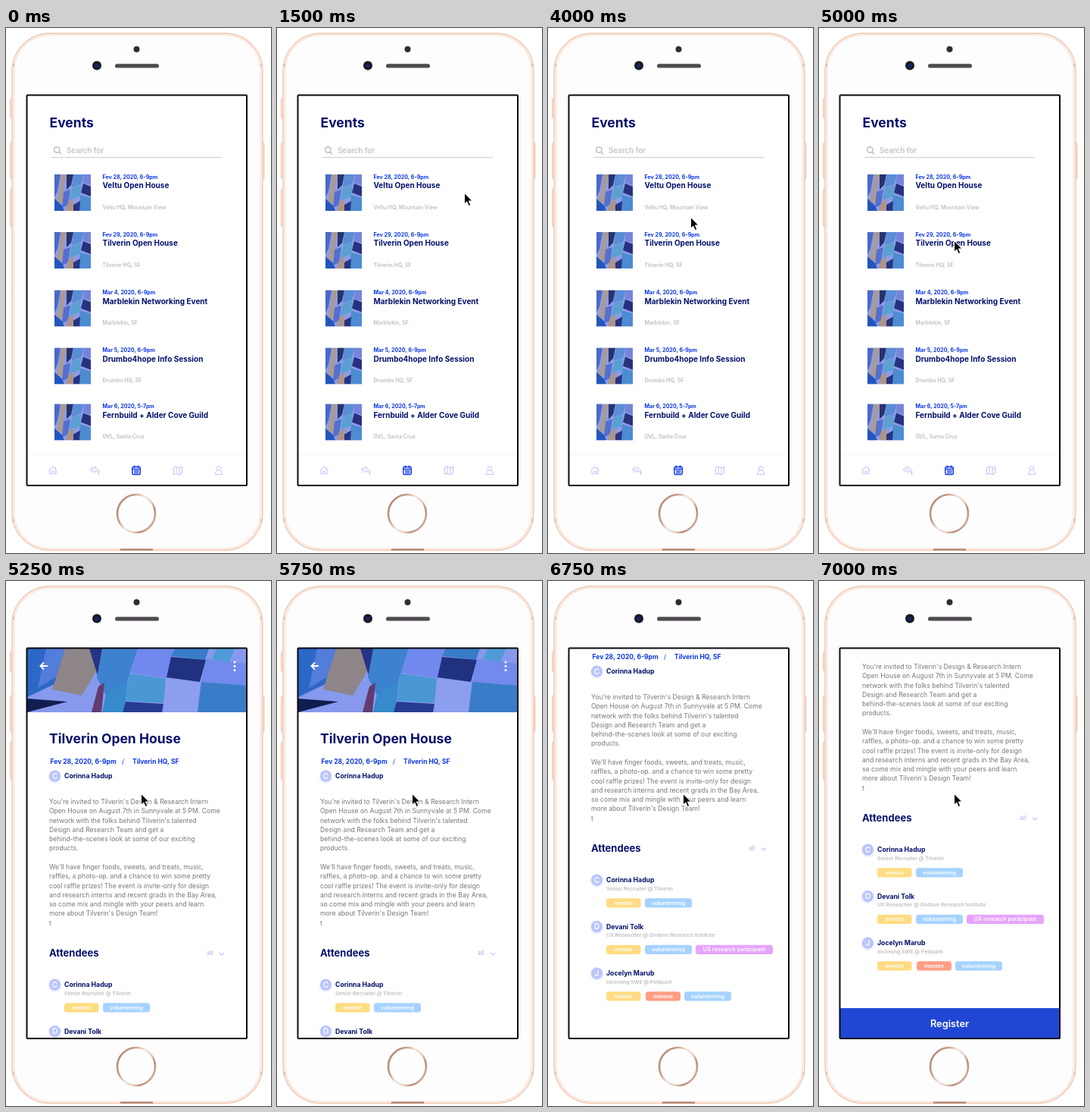
Animation, 350 px wide and 692 px high, one loop 8000 ms. Source, as an HTML page with a canvas:

```html
<!DOCTYPE html>
<html lang="en">
<head>
<meta charset="utf-8">
<title>Events app</title>
<style>
  html, body { margin: 0; width: 350px; height: 692px; overflow: hidden; background: #fff; }
  canvas { display: block; }
</style>
</head>
<body>
<canvas id="stage" width="350" height="692"></canvas>
<script>
const ctx = document.getElementById('stage').getContext('2d');
const LOOP = 8000;
const NAVY = '#04106b', BLUE = '#0a37e6', PALE = '#bac4fb', GRAY = '#bdbdbd', BODY = '#777';
const YELLOW = '#ffdc82', SKY = '#a5d3ff', PINK = '#e6a4fb', CORAL = '#ff9e85';

// [start ms, tip x, tip y]
const pointerSteps = [
  [500, 340, 74], [750, 304, 138], [1000, 304, 143], [1250, 255, 207], [1500, 247, 217],
  [1750, 232, 231], [3000, 198, 260], [3250, 195, 263], [3500, 192, 261], [4000, 188, 249],
  [4250, 180, 245], [4500, 176, 279], [4750, 175, 280], [5000, 178, 280]
];
// [start ms, scroll offset] of the detail page
const scrollSteps = [[5250, 0], [6250, 84], [6500, 86], [6750, 138], [7000, 178]];

const events = [
  [193, 'Fev 28, 2020, 6-9pm', 'Veltu Open House', 'Veltu HQ, Mountain View'],
  [269, 'Fev 29, 2020, 6-9pm', 'Tilverin Open House', 'Tilverin HQ, SF'],
  [345.5, 'Mar 4, 2020, 6-9pm', 'Marblekin Networking Event', 'Marblekin, SF'],
  [421.5, 'Mar 5, 2020, 6-9pm', 'Drumbo4hope Info Session', 'Drumbo HQ, SF'],
  [495.5, 'Mar 6, 2020, 5-7pm', 'Fernbuild + Alder Cove Guild', 'OVL, Santa Cruz']
];

const bodyLines = [
  "You're invited to Tilverin's Design & Research Intern",
  'Open House on August 7th in Sunnyvale at 5 PM. Come',
  "network with the folks behind Tilverin's talented",
  'Design and Research Team and get a',
  'behind-the-scenes look at some of our exciting',
  'products.', '',
  "We'll have finger foods, sweets, and treats, music,",
  'raffles, a photo-op. and a chance to win some pretty',
  'cool raffle prizes! The event is invite-only for design',
  'and research interns and recent grads in the Bay Area,',
  'so come mix and mingle with your peers and learn',
  "more about Tilverin's Design Team!", 't'
];

const mentor = [77, 45.5, 'mentor', YELLOW];
const attendees = [
  ['Corinna Hadup', 'Senior Recruiter @ Tilverin', [mentor, [128, 62, 'volunteering', SKY]]],
  ['Devani Tolk', 'UX Reseacher @ Ondavo Research Institute',
    [mentor, [128, 62, 'volunteering', SKY], [195, 102, 'UX research participant', PINK]]],
  ['Jocelyn Marub', 'Incoming SWE @ Pellquint',
    [mentor, [129, 46, 'mentee', CORAL], [180, 62, 'volunteering', SKY]]]
];

const stepAt = (steps, t) => steps.filter(s => s[0] <= t).pop();

// y is the middle of the capitals
function text(str, x, y, size, color, weight = 700, align = 'left') {
  ctx.font = `${weight} ${size}px Inter, sans-serif`;
  ctx.textAlign = align;
  ctx.fillStyle = color;
  ctx.fillText(str, x, y + size * 0.36);
}

function box(x, y, w, h, r, fill, stroke, width = 1) {
  ctx.beginPath();
  ctx.roundRect(x, y, w, h, r);
  paint(fill, stroke, width);
}

function disc(x, y, r, fill, stroke, width = 1) {
  ctx.beginPath();
  ctx.arc(x, y, r, 0, Math.PI * 2);
  paint(fill, stroke, width);
}

function shape(d, fill, stroke, width = 1) {
  const path = new Path2D(d);
  if (fill) { ctx.fillStyle = fill; ctx.fill(path); }
  if (stroke) { ctx.strokeStyle = stroke; ctx.lineWidth = width; ctx.stroke(path); }
}

function paint(fill, stroke, width) {
  if (fill) { ctx.fillStyle = fill; ctx.fill(); }
  if (stroke) { ctx.strokeStyle = stroke; ctx.lineWidth = width; ctx.stroke(); }
}

function at(x, y, draw) {
  ctx.save();
  ctx.translate(x, y);
  draw();
  ctx.restore();
}

function clipTo(x, y, w, h) {
  ctx.beginPath();
  ctx.rect(x, y, w, h);
  ctx.clip();
}

function drawPhone() {
  ctx.fillStyle = '#fff';
  ctx.fillRect(0, 0, 350, 692);
  const rim = '#efc8b2';
  for (const [y, h] of [[93, 26], [151, 48], [212, 50]]) box(5.5, y, 4, h, 1.5, '#f8ddcf', rim);
  box(337, 151, 4, 48, 1.5, '#f8ddcf', rim);
  box(8, 7, 331, 681.5, 50, '#fdeee6', rim, 1.4);
  box(11, 9.5, 325, 676.5, 47, '#fdfdfe', '#f9e3d8', 1);
  ctx.fillStyle = '#e2c8bb';
  for (const y of [47, 647]) {
    ctx.fillRect(8, y, 3, 4);
    ctx.fillRect(336, y, 3, 4);
  }
  ctx.fillStyle = '#a87b67';
  ctx.fillRect(151, 686.5, 43, 2);

  disc(172.5, 28, 4, '#302c2f');
  disc(120, 49.5, 6, '#191923');
  disc(120, 49.5, 2.6, '#16266c');
  box(144, 47.2, 58, 5.4, 2.7, '#4f4b50');

  const ring = ctx.createLinearGradient(147, 625, 197, 655);
  [[0, '#b4856f'], [0.25, '#c79b86'], [0.45, '#f3e4dc'], [0.65, '#e8cfc2'], [0.8, '#b98a74'], [1, '#d9b6a5']]
    .forEach(([p, c]) => ring.addColorStop(p, c));
  disc(172, 640, 25, '#fefefe', ring, 2.6);
}

function drawThumb(y) {
  at(64, y, () => {
    clipTo(0, 0, 48, 48);
    ctx.fillStyle = '#8d9ce7';
    ctx.fillRect(0, 0, 48, 48);
    shape('M0 0H8L4 22 0 30Z', '#4b69c9');
    shape('M9 0H16L12 20 16 29 9 39 3 35 7 18Z', '#a99a94');
    shape('M16 0H25L22 14 16 20Z', '#26336f');
    shape('M25 0H39L35 13 23 17Z', '#598dd6');
    shape('M39 0H48V14L38 11Z', '#7584db');
    shape('M38 12 48 16V29L35 24Z', '#26327d');
    shape('M23 18 35 14 34 29 20 34Z', '#5aa0d0');
    shape('M34 27 48 31V48H32Z', '#4d8bd2');
    shape('M12 23 21 20 18 40 10 44Z', '#536fd0');
    shape('M0 32 10 41 13 48H0Z', '#2356bd');
    shape('M18 37 25 32 25 48H15Z', '#ad9487');
    shape('M25 40 34 35 33 48H25Z', '#273483');
  });
}

function drawCover() {
  at(28, 89, () => {
    clipTo(0, 0, 290, 84);
    ctx.fillStyle = '#8799ed';
    ctx.fillRect(0, 0, 290, 84);
    shape('M0 0H50L42 44 0 64Z', '#2c68c7');
    shape('M25 0H50L44 34 14 52Z', '#527ddb');
    shape('M50 0H82L94 25 72 62 33 54Z', '#8d8588');
    shape('M82 0H114L94 39Z', '#263485');
    shape('M99 0H146L132 44 104 62 92 38Z', '#3d82cf');
    shape('M0 66 53 70 0 84Z', '#121d4f');
    shape('M94 50 102 45 98 84H85Z', '#623b70');
    shape('M104 61 133 43 128 84H99Z', '#378acb');
    shape('M146 0H194L184 39 136 32Z', '#7189ee');
    shape('M135 33 184 40 181 72 130 69Z', '#4a97d3');
    shape('M195 0H240L235 15 190 10Z', '#397cc8');
    shape('M190 11 236 15 228 44 184 38Z', '#20317f');
    shape('M236 14 290 20V49L230 44Z', '#718aeb');
    shape('M183 40 229 45 224 84H179Z', '#8d9eee');
    shape('M230 44 290 49V84H225Z', '#397cc8');
    shape('M250 0H274L267 18 244 14Z', '#4e9bd7');
    shape('M130 70 180 73 178 84H126Z', '#263b93');
  });
  shape('M55 112H46M50 107.5 45.5 112 50 116.5', null, '#fff', 2);
  for (const y of [107, 112.3, 117.6]) disc(302, y, 1.5, '#fff');
}

function drawNav() {
  ctx.fillStyle = '#f4f4f8';
  ctx.fillRect(28, 562, 290, 1);
  shape('M56.5 583.5 62 578 67.5 583.5M58 582.5V588H61V584.5H63.5V588H66V582M65.5 579V581', null, PALE);
  shape('M115 578 111 582 115 586M118 578 114 582 118 586V583.5Q122 583.5 122.5 589 124.5 581 118 580.5Z', null, PALE);
  box(166.8, 578.5, 10.5, 10, 1.5, null, BLUE, 1.4);
  shape('M167 581.5H177M169.5 576.5V580M174.5 576.5V580M169 584H175.5M169 586.3H175.5', null, BLUE, 1.3);
  shape('M221.5 579.5 225 578 229 580 232.5 578V587L229 589 225 587 221.5 588.5ZM225 578V587M229 580V589', null, PALE);
  disc(281, 580.5, 2.7, null, PALE);
  shape('M279 583Q276.5 584 276.5 588.5H285.5Q285.5 584 283 583', null, PALE);
}

function drawList() {
  text('Events', 57.5, 125, 17.5, NAVY);
  disc(67.3, 160.5, 3.7, null, GRAY, 1.5);
  shape('M70 163.3 73 166.3', null, GRAY, 1.6);
  text('Search for', 80, 161, 9.8, '#c4c4c4', 600);
  ctx.fillStyle = '#d2d2d2';
  ctx.fillRect(60, 170, 225, 1.2);
  for (const [y, date, title, place] of events) {
    drawThumb(y);
    text(date, 127.5, y + 3.2, 7.1, BLUE);
    text(title, 127.5, y + 14.8, 10, NAVY);
    text(place, 127.5, y + 43.3, 7, GRAY, 600);
  }
  drawNav();
}

function drawPerson(name, y) {
  ctx.save();
  ctx.shadowColor = 'rgba(120,140,240,.35)';
  ctx.shadowBlur = 3;
  ctx.shadowOffsetY = 1;
  disc(64.5, y, 7.5, PALE);
  ctx.restore();
  text(name[0], 64.5, y, 10, '#fff', 600, 'center');
  text(name, 77, y, 8.7, NAVY);
}

function drawDetail() {
  drawCover();
  text('Tilverin Open House', 57, 208, 17.5, NAVY);
  text('Fev 28, 2020, 6-9pm', 58.5, 238, 8.5, BLUE);
  text('/', 153, 238, 8.5, BLUE, 400);
  text('Tilverin HQ, SF', 167, 238, 8.5, BLUE);
  drawPerson(attendees[0][0], 257);
  bodyLines.forEach((line, i) => text(line, 57, 291 + i * 12.27, 8.6, BODY, 400));

  text('Attendees', 57, 490.5, 13, NAVY);
  text('all', 265, 490, 7.8, PALE, 600);
  shape('M282 490 285 493 288 490', null, PALE, 1.2);

  attendees.forEach(([name, role, tags], i) => {
    const y = 532 + i * 61.5;
    drawPerson(name, y);
    text(role, 77, y + 11.3, 6.8, GRAY, 600);
    for (const [x, w, label, color] of tags) {
      box(x, y + 24.3, w, 12.2, 3.5, color);
      text(label, x + w / 2, y + 30.2, 7.2, '#fff', 600, 'center');
    }
  });

  ctx.fillStyle = '#2046d4';
  ctx.fillRect(27, 741, 292, 42);
  text('Register', 172.5, 761, 12.8, '#fff', 600, 'center');
}

function drawPointer(x, y) {
  at(x, y, () => {
    ctx.lineJoin = 'round';
    shape('M.5 .5V15L3.8 12 6.2 17.5 8.8 16.4 6.4 11H10.8Z', '#080808', '#fff', 1);
  });
}

function render(now) {
  const t = now % LOOP;
  const scroll = stepAt(scrollSteps, t);
  const pointer = stepAt(pointerSteps, t);
  drawPhone();
  ctx.save();
  clipTo(27, 88, 291, 515);
  ctx.fillStyle = '#fff';
  ctx.fillRect(27, 88, 291, 515);
  if (scroll) at(0, -scroll[1], drawDetail);
  else drawList();
  ctx.restore();
  box(27.5, 88.5, 290.5, 514.5, 1, null, '#0b0b0d', 2);
  if (pointer) drawPointer(pointer[1], pointer[2]);
  requestAnimationFrame(render);
}
requestAnimationFrame(render);
</script>
</body>
</html>
```
